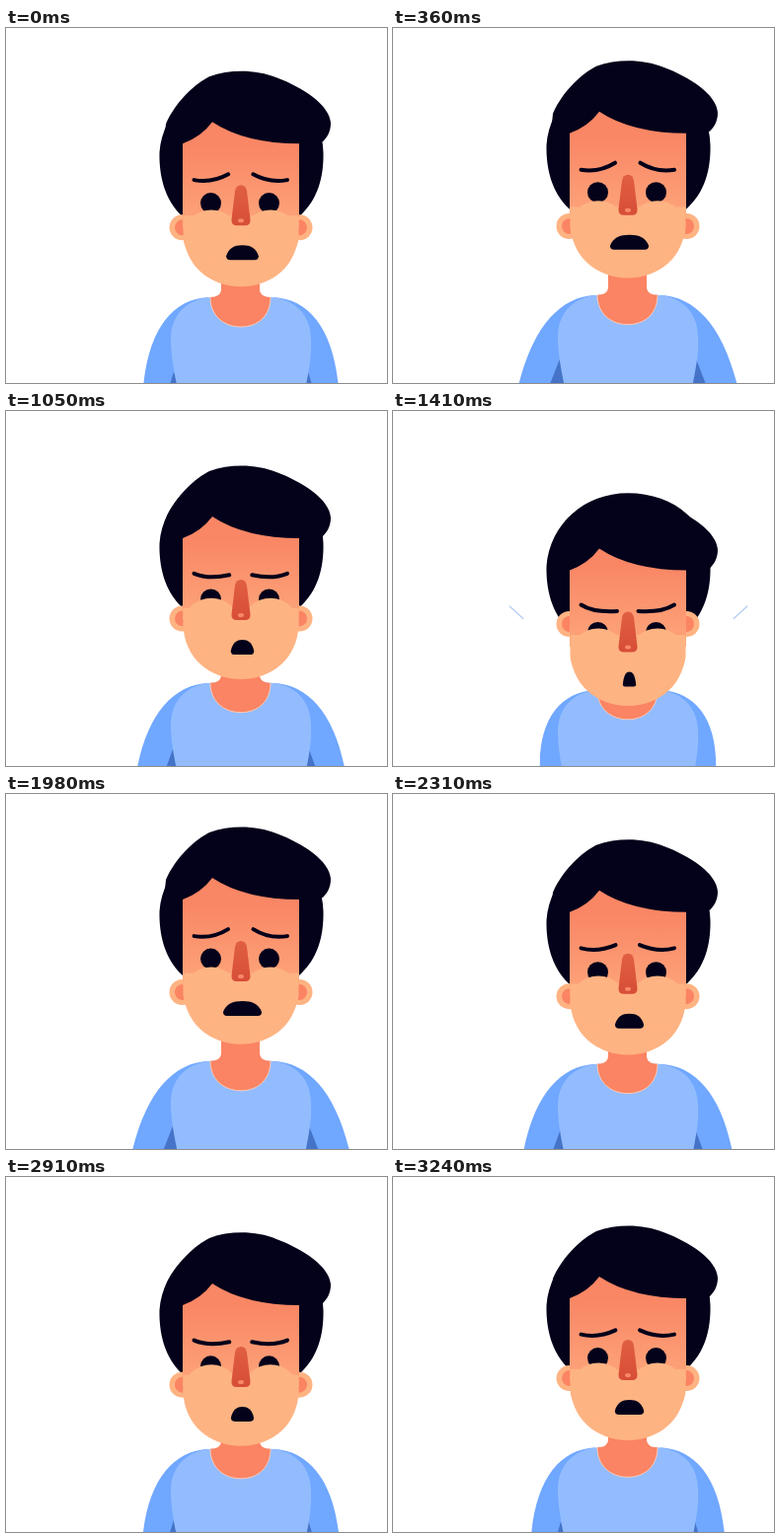
Recreate the animation shown at these times as an HTML page. Size 386x360 px, loop 3.27 s.

```html
<!DOCTYPE html>
<html lang="en">
<head>
<meta charset="utf-8">
<title>Sneezing</title>
<style>
  html, body { margin: 0; width: 100%; height: 100%; overflow: hidden; background: #fff; }
  svg { display: block; width: 386px; height: 360px; }
  .dark { fill: #03021a; }
  .skin { fill: #feb382; }
  .flush { fill: #fa8463; }
  .brow { fill: none; stroke: #03021a; stroke-width: 4; stroke-linecap: round; }
  .collar { fill: none; stroke: #fcc9b6; }
  .spray { stroke: #b4cdf4; stroke-width: 1.3; }
</style>
</head>
<body>
<svg viewBox="0 0 386 360">
  <defs>
    <linearGradient id="brow-skin" x1="0" y1="0" x2="0" y2="1">
      <stop offset=".25" stop-color="#f98664"/>
      <stop offset="1" stop-color="#fda57b"/>
    </linearGradient>
    <linearGradient id="nose-skin" x1="0" y1="0" x2="0" y2="1">
      <stop offset="0" stop-color="#e05f42"/>
      <stop offset="1" stop-color="#d74d37"/>
    </linearGradient>
  </defs>

  <path id="sleeves" fill="#70a7ff"/>
  <path id="armpits" fill="#4473c8"/>
  <g id="torso">
    <path fill="#92bcfe" d="M207 273C184 275 167 290 167 316C167 332 170 346 173 362V380H304V362C307 346 310 332 309 316C309 290 292 275 269 273Z"/>
    <path class="flush" d="M218 240H257V266Q258 273 268 273C268 292 255 303 238 303C221 303 207 292 207 273Q217 273 218 266Z"/>
    <path class="collar" d="M268 273C268 292 255 303 238 303C221 303 207 292 207 273"/>
  </g>

  <path id="hair" class="dark" d="M179 182C160 165 155 139 155.500 117C159 74 194 43 238 43C286 43 321 74 321.500 117C322 142 316 165 297 182Z"/>
  <g id="ears">
    <circle class="skin" cx="178.500" cy="201" r="13"/>
    <circle class="skin" cx="297.500" cy="201" r="13"/>
    <circle class="flush" cx="179" cy="201" r="8"/>
    <circle class="flush" cx="297" cy="201" r="8"/>
  </g>

  <g id="jaw">
    <rect x="179" y="90" width="118" height="112" fill="url(#brow-skin)"/>
    <path class="skin" d="M179.500 190H296.500V206C296 240 270 262 238 262C206 262 180 240 179.500 206Z"/>
  </g>
  <g id="eyes" class="dark">
    <circle cx="207.500" cy="177" r="10.500"/>
    <circle cx="266.500" cy="177" r="10.500"/>
  </g>
  <g id="cheeks" class="skin">
    <ellipse cx="208" cy="214.500" rx="28.500" ry="27"/>
    <ellipse cx="268" cy="214.500" rx="28.500" ry="27"/>
  </g>

  <g id="face">
    <path class="dark" d="M179 117Q198 110 209 95Q242 117 298 117L321 115C326 110 329 104 329 96C328 78 301 60 274 50C254 42 228 41 206 49C192 56 172 74 162 97L160 117Z"/>
    <path id="brows" class="brow"/>
    <path fill="url(#nose-skin)" d="M232 165Q233 159 238 159Q243 159 244 165L247.500 194Q248 200 242 200H234Q228 200 228.500 194Z"/>
    <ellipse cx="238" cy="195" rx="3" ry="2" fill="#f98868"/>
    <path id="mouth" class="dark"/>
  </g>
  <path id="spray" class="spray"/>
</svg>

<script>
const CYCLE = 1635;
// Turning points of the motion: a long breath in, then two sneezes.
const beats = [
  { at: 55,   nod: -4,    clench: 0,  sleeve: 139 },
  { at: 560,  nod: -13.5, clench: 0,  sleeve: 123 },
  { at: 890,  nod: 46,    clench: 1,  sleeve: 149 },
  { at: 1170, nod: -9,    clench: .4, sleeve: 127 },
  { at: 1410, nod: 44.5,  clench: 1,  sleeve: 149 }
];
const LEAD = 20;
const el = id => document.getElementById(id);
const clamp = v => Math.min(1, Math.max(0, v));
const mix = (a, b, k) => a + (b - a) * k;

function sample(name, time) {
  const t = (time - beats[0].at + CYCLE) % CYCLE + beats[0].at;
  const i = beats.findLastIndex(b => b.at <= t);
  const from = beats[i], to = beats[(i + 1) % beats.length];
  const length = (to.at - from.at + CYCLE) % CYCLE;
  const ease = (1 - Math.cos(Math.PI * (t - from.at) / length)) / 2;
  return mix(from[name], to[name], ease);
}

function shift(id, y) {
  el(id).setAttribute("transform", `translate(0 ${y.toFixed(2)})`);
}

function shape(id, d) {
  el(id).setAttribute("d", d);
}

// Draws a half with mirrored x added, around the given axis.
const both = (axis, half) => half(x => x) + half(x => 2 * axis - x);

function browPath(k) {
  return both(237.75, x => `M${x(190.5)} ${mix(154, 152, k)}`
    + `Q${x(mix(209, 203, k))} ${mix(157, 160, k)} ${x(mix(225, 227, k))} ${mix(147, 158.5, k)}`);
}

function mouthPath(w, h) {
  const c = 239.5, base = 235, r = Math.min(4, w / 3);
  return `M${c - w} ${base - r}C${c - w * .85} ${base - h * .8} ${c - w * .5} ${base - h} ${c} ${base - h}`
    + `S${c + w * .85} ${base - h * .8} ${c + w} ${base - r}Q${c + w} ${base} ${c + w - r} ${base}`
    + `H${c - w + r}Q${c - w} ${base} ${c - w} ${base - r}Z`;
}

function sleevePath(left, y) {
  return both(238, x => `M${x(205)} ${273 + y}C${x(170)} ${275 + y} ${x(115 + left * .22)} ${303 + y} ${x(left)} 361`
    + `H${x(173)}L${x(180)} ${310 + y}Z`);
}

function armpitPath(lift) {
  return both(238, x => `M${x(170)} ${361 - lift * 1.3}L${x(172 - lift * .6)} 361H${x(174)}Z`);
}

// A streak flies outwards on each side as the head comes down.
function sprayPath(t) {
  let d = "";
  for (const { at, clench } of beats) {
    if (clench < 1) continue;
    const age = t - at + 35;
    const tip = clamp(age / 65), tail = clamp((age - 20) / 52);
    if (tip <= tail) continue;
    const point = (x, k) => `${x(mix(150, 92, k))} ${mix(227, 174, k)}`;
    d += both(238.5, x => `M${point(x, tail)}L${point(x, tip)}`);
  }
  return d;
}

function draw(t) {
  const nod = sample("nod", t), clench = sample("clench", t);
  const sleeve = sample("sleeve", t + LEAD);
  const squint = 2 + 9.5 * Math.sin(clench * Math.PI / 2);
  const pinch = ((nod + 14) / 60 + Math.sqrt(clench)) / 2;
  const chest = nod * .22;
  shift("torso", chest);
  shift("hair", nod * .7 + 9);
  shift("ears", clench * 15);
  shift("jaw", nod * .83);
  shift("eyes", nod + clench * 3);
  shift("cheeks", nod - squint);
  shift("face", nod);
  shape("sleeves", sleevePath(sleeve, chest));
  shape("armpits", armpitPath(149 - sleeve));
  shape("brows", browPath(clench));
  shape("mouth", mouthPath(mix(20, 6.5, pinch), 15));
  shape("spray", sprayPath(t));
}

const begin = performance.now();
function tick() {
  draw((performance.now() - begin) % CYCLE);
  requestAnimationFrame(tick);
}
tick();
</script>
</body>
</html>
```
